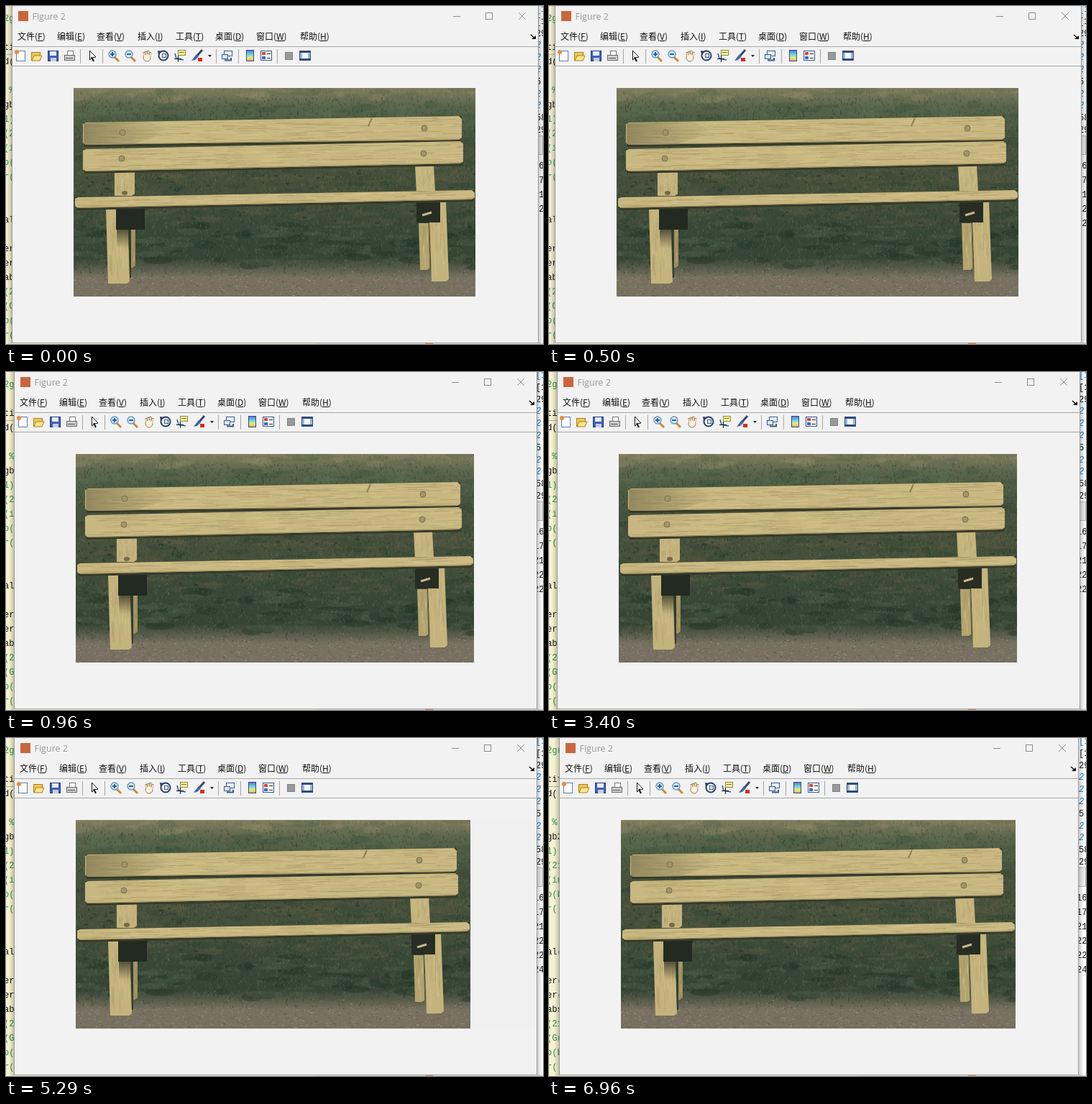
These frames come from a looping animation (747x470 px, 8000 ms). An HTML page with a canvas:

```html
<!DOCTYPE html>
<html lang="zh">
<head>
<meta charset="utf-8">
<style>
html, body { margin: 0; width: 100%; height: 100%; overflow: hidden; background: #f2f2f2; }
canvas { display: block; }
</style>
</head>
<body>
<canvas id="stage" width="747" height="470"></canvas>
<script>
const W = 747, H = 470, PX = 94, PY = 114, PW = 559, PH = 290, CUT = 5;
let g;

// ---- helpers ----
let seed = 7;
const rnd = (a = 0, b = 1) => a + (b - a) * (seed = (seed * 16807) % 2147483647) / 2147483647;
const pick = list => list[Math.floor(rnd(0, list.length))];
const mix = (a, b, k) => a + (b - a) * k;
function box(x, y, w, h, fill, edge) {
  if (fill) { g.fillStyle = fill; g.fillRect(x, y, w, h); }
  if (edge) { g.strokeStyle = edge; g.lineWidth = 1; g.strokeRect(x + .5, y + .5, w - 1, h - 1); }
}
function poly(p, fill, edge, width = 1) {
  g.beginPath();
  for (let i = 0; i < p.length; i += 2) g.lineTo(p[i], p[i + 1]);
  if (fill) { g.closePath(); g.fillStyle = fill; g.fill(); }
  if (edge) { g.strokeStyle = edge; g.lineWidth = width; g.stroke(); }
}
const line = (p, color, width) => poly(p, null, color, width);
function oval(x, y, rx, ry, fill, edge, width = 1) {
  g.beginPath();
  g.ellipse(x, y, rx, ry, 0, 0, 7);
  if (fill) { g.fillStyle = fill; g.fill(); }
  if (edge) { g.strokeStyle = edge; g.lineWidth = width; g.stroke(); }
}
function fade(x0, y0, x1, y1, ...colors) {
  const f = g.createLinearGradient(x0, y0, x1, y1);
  colors.forEach((c, i) => f.addColorStop(i / (colors.length - 1), c));
  return f;
}
function text(s, x, y, color, font) {
  g.font = font;
  g.fillStyle = color;
  g.fillText(s, x, y);
}
function layer(w, paint) {
  const c = document.createElement('canvas'), old = g;
  c.width = w;
  c.height = PH;
  g = c.getContext('2d');
  paint();
  g = old;
  return c;
}

// ---- picture ----
const GRAIN = ['#9a8b5e60', '#dccb9470', '#ab9a6660', '#d6c58c70'];
// board: left and right edge, top at each end, height at each end
function board(x0, x1, y0, y1, h0, h1) {
  poly([x0 + 2, y0 + h0 + 3, x0, y0, x1, y1, x1 - 2, y1 + h1 + 3], '#363a29');
  poly([x0, y0 + 2, x0 + 4, y0, x1 - 4, y1, x1, y1 + 4, x1, y1 + h1 - 3, x1 - 4, y1 + h1,
    x0 + 4, y0 + h0, x0, y0 + h0 - 3], '#c8b780');
  for (let i = 0; i < h0 * 9; i++) {
    const a = rnd(), b = Math.min(1, a + rnd(.02, .09)), k = rnd(.05, .95);
    const at = u => [mix(x0, x1, u), mix(y0, y1, u) + k * mix(h0, h1, u)];
    line([...at(a), ...at(b)], pick(GRAIN));
  }
  line([x0 + 3, y0 + h0 - .5, x1 - 3, y1 + h1 - .5], '#94865c');
}
function post(x0, x1, w, y0, y1, tone = '#c4b37c') {
  poly([x0, y0, x0 + w, y0, x1 + w, y1 - 3, x1 + w - 4, y1, x1, y1], tone);
  for (let i = 0; i < w; i++) {
    const k = rnd(.1, .9) * w, a = rnd(0, .7), b = a + rnd(.1, .3);
    line([mix(x0, x1, a) + k, mix(y0, y1, a), mix(x0, x1, b) + k, mix(y0, y1, b)], pick(GRAIN));
  }
}
function lawn() {
  box(PX, PY, PW, PH, fade(0, PY, 0, PY + PH, '#827d5e', '#58644a', '#4b5a43', '#48533f', '#46503d',
    '#45503c', '#43503c', '#3b4a38', '#364635', '#384535', '#787161', '#787161'));
  const bands = [['#8a846270', '#5b694e60'], ['#5a6f5060', '#3c523d60'], ['#5f5b4460', '#35473470'],
    ['#5c594255', '#33463370'], ['#4a5f4860', '#24372980'], ['#868070', '#6a6556']];
  for (let i = 0; i < 420; i++) {
    const y = rnd(0, .86);
    oval(PX + rnd(0, PW), PY + y * PH, rnd(5, 24), rnd(2, 6),
      pick(bands[y < .06 ? 0 : Math.min(4, 1 + Math.floor(y * 4.6))]));
  }
  for (let i = 0; i < 9000; i++) {
    const x = PX + rnd(0, PW), y = PY + rnd(0, PH);
    if (y > 370 + rnd(-8, 8)) box(x, y, rnd(1, 3), 1, pick(['#958f80', '#555445', '#a39b84', '#6e6855']) + 'a0');
    else line([x, y, x + rnd(-2, 2), y + rnd(2, 4)], pick(y < 126 ? ['#97906b80', '#6a694f80', '#56624880']
      : ['#65765680', '#2b3c2d80', '#6c684c70', '#3e533c80', '#22332780']));
  }
  for (let i = 0; i < 90; i++) oval(PX + rnd(0, PW), rnd(228, 320), rnd(1, 4), rnd(1, 2), '#28342899');
}
function bench() {
  g.translate(-PX, -PY);
  lawn();
  // posts, legs and brackets
  post(151, 151, 28, 228, 264);
  post(569, 571, 26, 222, 260);
  post(174, 174, 6, 305, 364, '#9c8e60');
  post(139, 142, 30, 282, 386);
  box(153, 282, 40, 29, '#222a21');
  box(154, 311, 17, 26, fade(0, 311, 0, 337, '#3a3a28cc', '#3a3a2800'));
  line([172, 311, 173, 378], '#33372a', 2);
  post(574, 576, 14, 302, 367, '#b3a36e');
  post(588, 592, 24, 271, 383);
  line([588, 303, 590, 372], '#6d6446');
  box(571, 272, 33, 29, '#272d23');
  line([579, 291, 592, 287], '#c5b68a', 3);

  board(107, 634, 162, 153, 31, 33);
  board(107, 636, 199, 188, 31, 31);
  poly([108, 163, 200, 161, 230, 176, 180, 191, 108, 192], fade(107, 0, 230, 0, '#77704caa', '#77704c00'));
  board(96, 652, 266, 256, 15, 13);
  for (const x of [162, 582]) {
    oval(x, x < 300 ? 176 : 170, 4, 4, '#a39569', '#776e4b');
    oval(x - 1, x < 300 ? 212 : 205, 4, 4, '#a39569', '#776e4b');
  }
  oval(165, 260, 4, 3, '#766948');
  line([509, 156, 504, 167], '#8d7e53', 2);
}

// a seam is a few evenly spaced points plus a seeded zigzag, one x per row
function makeSeam(...points) {
  const gap = PH / (points.length - 1), zig = Array.from({ length: 30 }, (_, i) => (i % 2 ? 1 : -1) * rnd(0, 3));
  const along = (list, u) => mix(list[Math.floor(u)], list[Math.floor(u) + 1], u % 1);
  return Array.from({ length: PH }, (_, y) => Math.round(along(points, y / gap) + along(zig, y / 11)) - 2);
}
function carve(src, seam) {
  return layer(src.width - CUT, () => seam.forEach((x, y) => {
    const rest = src.width - x - CUT;
    g.drawImage(src, 0, y, x, 1, 0, y, x, 1);
    g.drawImage(src, x + CUT, y, rest, 1, x, y, rest, 1);
  }));
}
// fills the red channel along the seam
function mark(src, seam) {
  return layer(src.width, () => {
    g.drawImage(src, 0, 0);
    g.globalCompositeOperation = 'lighter';
    seam.forEach((x, y) => box(x, y, CUT, 1, '#f00'));
  });
}
const seamA = makeSeam(303, 303, 316, 320, 321, 325, 321, 322, 319, 332, 334);
const seamB = makeSeam(388, 389, 387, 390, 400, 412, 425, 431, 434, 448, 441);
const full = layer(PW, bench);
const once = carve(full, seamA), twice = carve(once, seamB);
const fullMarked = mark(full, seamA), onceMarked = mark(once, seamB);

// ---- editor behind the window ----
const MONO = '12px "Liberation Mono", monospace';
// a leading % marks a comment
const CODE = "%2gr,,tif,d(',,% %,gb2,%1),%(21,%(in,%o(b,%r(),,,al(,,er(,er(,abs,%(21,%(Gr,%o(b,%r()".split(',');
const OUTPUT = '[1,[1,29,2,2,2,5,2,2,58,29'.split(',');
const COUNTS = [16, 17, 21, 22, 22, 24];
function backdrop(rows) {
  box(0, 0, W, H, '#fff');
  box(0, 0, 430, H, '#f5f3cf');
  box(0, 67, 20, 1, '#b5b59c');
  CODE.forEach((s, i) => text(s.replace('%', ''), -3, 21 + i * 20, s[0] === '%' ? '#2f8f3c' : '#111', MONO));
  OUTPUT.forEach((s, i) => {
    const link = s === '2';
    text(s, 737, 8 + i * 16.8, link || !i ? '#1b78b8' : '#111', (link ? 'italic ' : '') + MONO);
  });
  box(730, 180, 17, 27, '#ececec', '#b4bac4');
  COUNTS.slice(0, rows).forEach((n, i) => text(n, 734, 226 + i * 20, '#111', MONO));
  box(430, 468, 317, 2, '#e6e6e6');
  box(583, 468, 11, 2, '#e8894a');
}

// ---- toolbar ----
function lens(x, plus) {
  line([x + 9, 71, x + 15, 77], '#c98a35', 3);
  oval(x + 6, 67, 5, 5, '#d5ecfb', '#6d93b8', 1.4);
  box(x + 3, 66, 6, 2, '#1d5fae');
  if (plus) box(x + 5, 64, 2, 6, '#1d5fae');
}
function toolbar() {
  // new, open, save, print
  box(14, 62, 13, 15, '#fff', '#5a7fae');
  oval(15, 64, 3, 3, '#ed8a3c');
  box(35, 64, 13, 12, '#efc75c', '#a8801e');
  poly([36, 76, 39, 69, 50, 69, 47, 76], '#ffe58c', '#a8801e');
  box(58, 62, 15, 15, '#3f5fb8', '#29377c');
  box(61, 63, 9, 6, '#e6edfa');
  box(62, 72, 8, 5, '#c9ced9');
  box(85, 62, 9, 7, '#fff', '#777');
  box(81, 68, 15, 8, '#cfcfd4', '#666');
  line([83, 72.5, 93, 72.5], '#555');
  // pointer
  poly([116.5, 62, 116.5, 75, 120, 72, 125, 71], '#fff', '#111');
  line([119, 71, 122, 77], '#111', 2);
  lens(142, true);
  lens(165, false);
  // hand
  for (let i = 0; i < 4; i++) line([192 + i * 3, 64 - i % 3, 193 + i * 2, 72], '#99754c', 3);
  oval(196, 72, 5, 5, '#fff3df', '#99754c');
  for (let i = 0; i < 4; i++) line([192 + i * 3, 65 - i % 3, 193 + i * 2, 73], '#fff3df', 1.5);
  // rotate
  oval(219, 69, 6.5, 6.5, null, '#2b3f66', 2);
  poly([211, 62, 217, 63, 212, 68], '#2b3f66');
  box(217, 66, 6, 6, '#dce7f5', '#445b85');
  // data cursor
  box(239, 61, 11, 8, '#fff4a0', '#8f8738');
  line([241, 64.5, 248, 64.5], '#77702e');
  line([235, 66, 237, 73, 247, 75], '#2857a8', 1.5);
  line([234, 73.5, 244, 73.5], '#111');
  line([239.5, 69, 239.5, 78], '#111');
  // brush
  line([273, 61, 266, 69], '#39496a', 3);
  poly([265, 67, 268, 70, 263, 75, 258, 76], '#3767ad');
  box(267, 72, 6, 5, '#dc2a20');
  poly([281, 68, 286, 68, 283.5, 71], '#222');
  // link
  box(303, 62, 12, 8, '#eef3fb', '#345a91');
  box(300, 67, 9, 7, '#dce7f5', '#345a91');
  line([304, 75.5, 313, 75.5, 313, 72], '#435878', 2);
  // color bar, legend, hide and show tools
  box(334, 61, 11, 16, fade(0, 62, 0, 77, '#6570d8', '#62d5e0', '#e7ed78', '#ec9a5b'), '#334b85');
  box(354, 62, 16, 14, '#fff', '#38558e');
  for (const y of [64, 70]) {
    box(356, y, 5, 4, y < 70 ? '#d5443a' : '#3f62c8');
    box(363, y + 2, 5, 1, '#222');
  }
  box(388, 64, 11, 11, '#999', '#828282');
  box(408, 62, 16, 14, '#2e4b80');
  box(409, 65, 14, 8, '#9db6da');
  box(412, 65, 8, 8, '#f5f8fd');
  for (const x of [103, 134, 292, 323, 377]) box(x, 60, 1, 20, '#a5a5a5');
}

// ---- window ----
const MENU = { 文件: 'F16', 编辑: 'E71', 查看: 'V126', 插入: 'I183', 工具: 'T236', 桌面: 'D291', 窗口: 'W348', 帮助: 'H409' };
const UI = '12px "Noto Sans CJK SC", "Noto Sans CJK", sans-serif';
function frame(left, right) {
  box(left - 7, 0, 7, H, fade(left - 7, 0, left, 0, '#0000', '#0003'));
  box(right, 0, 7, H, fade(right, 0, right + 7, 0, '#0003', '#0000'));
  box(left, -1, right - left, 470, '#f2f2f2', '#9b9b9b');
  for (const y of [56, 83]) box(left + 1, y, right - left - 2, 1, '#a8a8a8');
  g.save();
  g.translate(right - 741, 0);
  box(622, 14, 10, 1, '#8c8c8c');
  box(667, 9, 10, 10, null, '#8c8c8c');
  line([713, 9, 723, 19], '#8c8c8c');
  line([723, 9, 713, 19], '#8c8c8c');
  line([730, 40, 735, 44.5], '#111', 1.5);
  poly([737, 41, 737, 46, 731, 46], '#111');
  g.restore();
}
function controls() {
  box(17, 7, 14, 14, '#c9663c');
  text('Figure 2', 36.5, 19, '#999', '12.5px "Open Sans", sans-serif');
  for (const [name, spot] of Object.entries(MENU)) {
    const key = spot[0], x = +spot.slice(1);
    text(`${name}(${key})`, x, 47, '#111', UI);
    box(Math.round(x + g.measureText(name + '(').width), 48, Math.round(g.measureText(key).width), 1, '#111');
  }
  toolbar();
}

// start time, window inset step, picture, rows in the list, redrawn margin
const STEPS = [
  [0, 0, full, 4], [500, 0, full, 5], [660, 0, fullMarked, 5], [960, 1, once, 5],
  [5020, 1, onceMarked, 6, true], [5290, 1, twice, 6, true], [5410, 2, twice, 6]
];
function draw(t) {
  const [, step, picture, rows, margin] = STEPS.filter(s => s[0] <= t).pop();
  const dx = step * 3, right = 741 - step * 2;
  backdrop(rows);
  frame(8 + dx, right);
  g.save();
  g.translate(dx, 0);
  controls();
  if (margin) box(PX + picture.width, PY, right - 1 - dx - PX - picture.width, PH, '#f0f0f0');
  g.drawImage(picture, PX, PY);
  g.restore();
}

g = document.getElementById('stage').getContext('2d');
const start = performance.now();
function tick() {
  draw((performance.now() - start) % 8000);
  requestAnimationFrame(tick);
}
tick();
</script>
</body>
</html>
```
